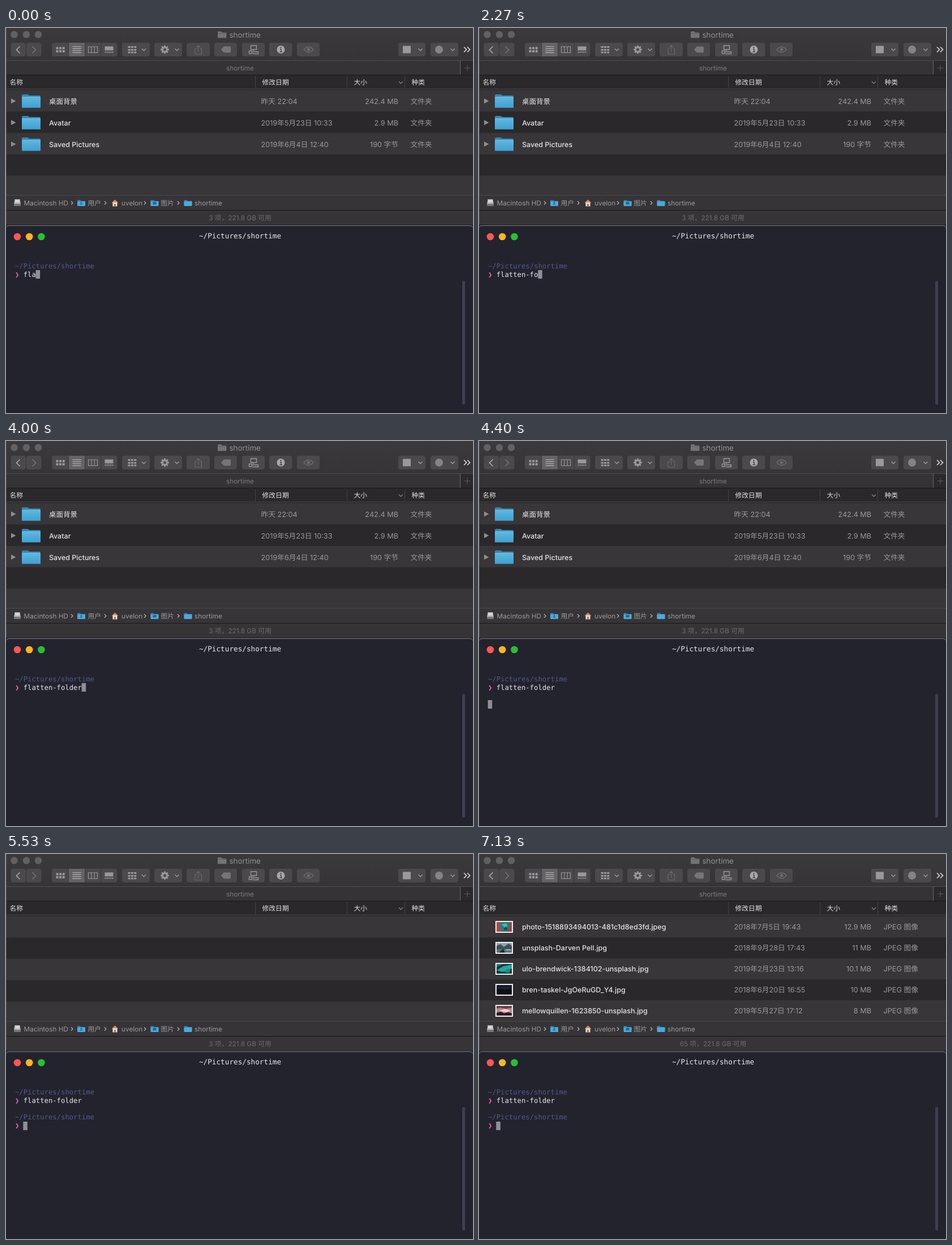
An HTML page that plays this animation: 825x679 px, repeating every 7190 ms.

```html
<!DOCTYPE html>
<html lang="zh-CN">
<head>
<meta charset="utf-8">
<title>flatten-folder</title>
<style>
html, body { margin: 0; width: 100%; height: 100%; overflow: hidden; background: #23232e; }
svg { display: block; width: 825px; height: 679px; }
text { font-family: Inter, "Noto Sans CJK SC", "Noto Sans CJK", sans-serif; text-rendering: geometricPrecision; white-space: pre; }
.mono { font-family: "DejaVu Sans Mono", monospace; }
</style>
</head>
<body>
<svg id="stage" viewBox="0 0 825 679" xmlns="http://www.w3.org/2000/svg"></svg>
<script>
const LOOP = 7190;
const COMMAND = 'flatten-folder';
const KEY_MS = 295, ENTER = 4070, DONE = 4800, CLEARED = 5530, LISTED = 5930;
const CHAR = 7.37, LEFT = 16;
const ICON = '#99989a', DIM = '#6c6a6d';

const rect = (x, y, w, h, fill, r = 0) =>
  `<rect x="${x}" y="${y}" width="${w}" height="${h}" rx="${r}" fill="${fill}"/>`;
const circle = (x, y, r, fill) => `<circle cx="${x}" cy="${y}" r="${r}" fill="${fill}"/>`;
const path = (d, fill) => `<path d="${d}" fill="${fill}"/>`;
const line = (d, color, w = 1) =>
  `<path d="${d}" fill="none" stroke="${color}" stroke-width="${w}"/>`;
const text = (x, y, s, size, fill, extra = '') =>
  `<text x="${x}" y="${y}" font-size="${size}" fill="${fill}" ${extra}>${s}</text>`;
const mono = (x, y, s, fill, id = '') => text(x, y, s, 12.24, fill, `class="mono" ${id}`);
const group = (id, content) => `<g id="${id}">${content}</g>`;
const at = (x, y, content, scale = 1) =>
  `<g transform="translate(${x} ${y}) scale(${scale})">${content}</g>`;
const MIDDLE = 'text-anchor="middle"', END = 'text-anchor="end"', MEDIUM = 'font-weight="500"';

const grid = (x, y, cols, rows, w, h, dx, dy) => {
  let out = '';
  for (let r = 0; r < rows; r++)
    for (let c = 0; c < cols; c++) out += rect(x + c * dx, y + r * dy, w, h, ICON, .6);
  return out;
};
const chevron = x => line(`M${x - 3.5} 36.5l3.5 3.5 3.5-3.5`, ICON, 1.5);

const folder = at(28, 116,
  path('M0 3Q0 1 2 1H10Q11.5 1 12.5 2.5L13 3H31Q33 3 33 5V20H0Z', '#3a85ad') +
  rect(0, 5.5, 33, 19.5, 'url(#blue)', 1.5) + rect(.5, 5.5, 32, .8, '#7cc9ea') +
  rect(.5, 24, 32, 1, '#3585b0'));
const miniFolder = x => at(x, 303,
  path('M0 1.5Q0 .5 1 .5H5L6.5 2H13Q14 2 14 3V8H0Z', '#3a85ad') + rect(0, 3, 14, 8, '#4aaadb', 1));

function gear(x, y) {
  let out = '';
  for (let a = 0; a < 360; a += 45)
    out += `<rect x="-1.4" y="-7.4" width="2.8" height="4" fill="${ICON}" transform="rotate(${a})"/>`;
  return at(x, y, out + `<circle r="4" fill="none" stroke="${ICON}" stroke-width="3"/>`);
}

function toolbar() {
  const buttons = [[8.5, 26.5], [36, 26.5], [81, 115.5], [205, 49], [262, 49], [319, 41],
    [368, 40], [417, 40], [465, 40.5], [514, 40], [693, 48], [750, 49]];
  return rect(0, 0, 825, 58, 'url(#bar)') +
    [14.5, 36, 57].map(x => circle(x, 11.5, 6.3, '#626063')).join('') +
    path('M374 7.5Q374 6 375.5 6H380L382 8H388Q389.500 8 389.500 9.500V16Q389.500 17.500 388 17.500H375.500Q374 17.500 374 16Z', '#757376') +
    rect(374, 9.2, 15.5, .8, '#5b595c') +
    text(394.5, 17, 'shortime', 13.4, '#929193') +
    buttons.map(([x, w]) => rect(x, 26, w, 24, '#4b494b', 4)).join('') +
    rect(110.5, 26, 29, 24, '#656366') +
    line('M110.5 26v24M139.5 26v24M168 26v24', '#3a383b') +
    line('M24.5 32.500L18.500 38.500 24.500 44.500', '#a7a6a8', 1.7) +
    line('M46.5 32.5l6 6-6 6', '#737174', 1.7) +
    grid(88.5, 33.5, 3, 2, 4, 4, 5.6, 5.6) +
    line('M117.5 33h15M117.5 36.500h15M117.5 40h15M117.5 43.500h15', '#c2c1c3', 1.2) +
    line('M145.500 33h16v10.500h-16zM150.800 33v10.500M156.200 33v10.500', ICON, 1.2) +
    rect(174.5, 32.500, 15, 7, ICON, .6) + grid(174.5, 41.5, 5, 1, 2.2, 2.2, 3.2, 0) +
    grid(215.5, 32, 3, 1, 4.2, 3, 5.3, 0) + grid(215.5, 37, 3, 2, 4.2, 3, 5.3, 4.5) + chevron(243.5) +
    gear(280.5, 38) + chevron(302) +
    line('M337 36h-3v10h11.500v-10h-3M339.700 42V31M336.500 34l3.200-3.200 3.200 3.200', DIM, 1.2) +
    path('M380 38L384 33.500Q385 32.500 386 32.500H395Q397 32.500 397 34.500V41.500Q397 43.500 395 43.500H386Q385 43.500 384 42.500Z', '#777578') +
    line('M432.500 31h10v7h-10zM429.500 40.500h5v4.500h-5zM437 38v2.500M436 42h9.500v3.500h-9.500', ICON, 1.4) +
    circle(485.5, 38, 7, '#a8a7a9') + circle(485.5, 34.5, 1.2, '#4b494b') +
    line('M484 37.500h2v4.500M483.500 42h4.500', '#4b494b', 1.6) +
    line('M526 38Q534.500 28.500 543 38 534.500 47.500 526 38Z', DIM, 1.3) + circle(534.5, 38, 2.8, DIM) +
    rect(701, 31.5, 14, 13, ICON) + chevron(732) +
    circle(765, 38, 7, '#858386') + chevron(789) +
    line('M809 33.500l4.500 4.500-4.500 4.500M815 33.500l4.500 4.500-4.500 4.500', '#dddcde', 1.6);
}

function tabsAndHeader() {
  return rect(0, 57, 825, 1, '#504e51') + rect(0, 58, 825, 25, '#353336') +
    rect(802, 58, 23, 25, '#2b292c') + rect(802, 58, 1, 25, '#6a686b') +
    line('M809.5 70.500h11M815 65v11', '#5a585b') +
    text(413.5, 75.3, 'shortime', 11.8, '#7d7b7e', MIDDLE) +
    rect(0, 83, 825, 25, '#2a282b') + rect(0, 82.5, 825, 1, '#171518') +
    [440, 602, 704].map(x => rect(x, 85, 1, 21, '#454346')).join('') +
    [[6.5, '名称'], [452.5, '修改日期'], [614.5, '大小'], [716.5, '种类']]
      .map(([x, s]) => text(x, 99.5, s, 11.8, '#e3e2e4', MEDIUM)).join('') +
    line('M694 94.500l3.500 3.500 3.500-3.500', '#8b898c', 1.2) +
    rect(0, 107, 825, 1, '#474548');
}

function stripes(top, pitch) {
  let out = rect(0, 108, 825, 187, '#2a282b');
  for (let i = 0; i < 5; i += 2)
    out += rect(0, top + i * pitch, 825, Math.min(pitch, 295 - top - i * pitch), '#383639');
  return out;
}

const row = (y, [name, date, size, kind], id = '') =>
  text(76, y + 4.6, name, 12.5, '#e4e3e5', MEDIUM) +
  text(450.5, y + 4.6, date, 12.7, '#9b999c') +
  text(693, y + 4.6, size, 12.7, '#9b999c', `${END} ${id}`) +
  text(714.5, y + 4.6, kind, 12.7, '#9b999c');

const folders = [
  ['桌面背景', '昨天 22:04', '242.4 MB'],
  ['Avatar', '2019年5月23日 10:33', '2.9 MB'],
  ['Saved Pictures', '2019年6月4日 12:40', '190 字节'],
];
const folderRows = () => folders.map((f, i) =>
  at(0, i * 38, folder + path('M9 124.300V133.300L17.500 128.800Z', '#8f8d90')) +
  row(129 + i * 38, [...f, '文件夹'], i === 2 ? 'id="lastSize"' : '')).join('');

const photos = [
  ['photo-1518893494013-481c1d8ed3fd.jpeg', '2018年7月5日 19:43', '12.9 MB'],
  ['unsplash-Darven Pell.jpg', '2018年9月28日 17:43', '11 MB'],
  ['ulo-brendwick-1384102-unsplash.jpg', '2019年2月23日 13:16', '10.1 MB'],
  ['bren-taskel-JgOeRuGD_Y4.jpg', '2018年6月20日 16:55', '10 MB'],
  ['mellowquillen-1623850-unsplash.jpg', '2019年5月27日 17:12', '8 MB'],
];
const thumbs = [
  rect(0, 0, 27, 17, '#1f7f78') + path('M0 0H8L5 9 11 17H0Z', '#b8434a') +
    path('M21 0H27V17H18L23 9Z', '#a33f48') + path('M9 4l8-2 3 5-7 2Z', '#45b8a6') + rect(13, 10, 6, 4, '#14534f'),
  rect(0, 0, 27, 17, '#8ba3ad') + path('M0 5L7 2 13 7 21 1 27 5V11H0Z', '#3d5059') +
    rect(0, 11, 27, 6, '#5b717b') + path('M4 17L12 10 15 17Z', '#1f2b32') + rect(16, 11, 9, 1.5, '#c3d0d5'),
  rect(0, 0, 27, 17, '#0f3b3d') + path('M0 11L12 4 27 1V8L10 14Z', '#27a79c') +
    path('M12 14L19 9 25 10 22 16Z', '#1c8a84') + path('M0 0H11L0 6Z', '#1c7773'),
  rect(0, 0, 27, 17, '#151a2b') + path('M0 9L8 6 15 9 22 7 27 9V17H0Z', '#0c0e17') + rect(3, 5, 20, 1, '#2d3044'),
  rect(0, 0, 27, 17, '#b9838e') + path('M0 0H27V3L16 5 5 3 0 5Z', '#64414f') +
    path('M4 9L14 5 25 8 18 11Z', '#f2d0c8') + path('M0 12L8 10 13 13 20 11 27 13V17H0Z', '#2a1a24'),
];
const photoRows = () => photos.map((p, i) => {
  const y = 129 + i * 37;
  return rect(29, y - 11, 31, 21, '#eeeeee') + at(31, y - 9, thumbs[i]) + row(y - .2, [...p, 'JPEG 图像']);
}).join('');

function footer() {
  const crumb = (x, s) => text(x, 312.600, s, 11.8, '#9d9b9e');
  return rect(0, 295, 825, 53, '#363437') + rect(0, 294.500, 825, 1, '#4c4a4d') +
    rect(0, 321, 825, 1, '#19171a') +
    path('M15.500 302H24.500L26 311H14Z', '#b9b8ba') + rect(14, 310, 12, 4, '#77757a', .8) +
    rect(16.500, 303.500, 7, 4, '#dad9db') +
    miniFolder(126) + circle(133, 307.700, 1.3, '#24678a') + rect(131, 309.400, 4, 2, '#24678a', 1) +
    path('M186.500 308.500L192.500 302.500 198.500 308.500Z', '#d98a5a') + rect(188.500, 307.500, 8, 7, '#e8e2d8') +
    rect(191.200, 310, 2.600, 4.500, '#9a6140') +
    miniFolder(255.500) + rect(259.500, 306.800, 6, 4.400, '#24678a', .5) + miniFolder(314.500) +
    crumb(31.500, 'Macintosh HD') + crumb(144.500, '用户') + crumb(204, 'uvelon') +
    crumb(273.500, '图片') + crumb(333, 'shortime') +
    [115.500, 174.500, 244.500, 303.500].map(x => line(`M${x - .5} 305.500l3 3-3 3`, '#b0aeb1', 1.3)).join('') +
    text(413.500, 338.600, '', 11.8, '#6d6b6e', `${MIDDLE} id="status"`);
}

function terminal() {
  const cwd = '~/Pictures/shortime', blue = '#505a88', pink = '#f56cb5';
  return rect(0, 347, 825, 1, '#1b1a1f') + rect(0, 348, 825, 340, '#85858c', 5) +
    rect(0, 349, 825, 340, '#23232e', 5) +
    ['#fc5753', '#fdb424', '#27c132'].map((c, i) => circle(20 + i * 21.200, 368, 6.300, c)).join('') +
    text(413.500, 371, cwd, 12.7, '#e9e9ec', `class="mono" ${MIDDLE}`) +
    rect(806, 446, 5, 218, '#3f3f53', 2.500) +
    mono(LEFT, 424, cwd, blue) + mono(LEFT, 439, '❯', pink) + mono(30.700, 439, '', '#e9e9ec', 'id="typed"') +
    group('nextPrompt', mono(LEFT, 468.300, cwd, blue) + mono(LEFT, 483.300, '❯', pink)) +
    `<rect id="cursor" width="7.500" height="15" fill="#908f94"/>`;
}

const stage = document.getElementById('stage');
stage.innerHTML = `<defs>
  <linearGradient id="bar" x2="0" y2="1"><stop stop-color="#3b393c"/><stop offset="1" stop-color="#363437"/></linearGradient>
  <linearGradient id="blue" x2="0" y2="1"><stop stop-color="#5cb9e3"/><stop offset="1" stop-color="#429fce"/></linearGradient>
</defs>` +
  group('folderView', stripes(109.500, 37.700) + group('folderRows', folderRows())) +
  group('photoView', stripes(110, 37) + photoRows()) +
  toolbar() + tabsAndHeader() + footer() + rect(0, 0, 1, 348, '#4f4d50') + terminal();

const el = id => document.getElementById(id);
const show = (id, on) => el(id).setAttribute('visibility', on ? 'inherit' : 'hidden');
const setText = (id, s) => { if (el(id).textContent !== s) el(id).textContent = s; };

function render(t) {
  const typed = Math.min(COMMAND.length, 3 + Math.floor(t / KEY_MS));
  setText('typed', COMMAND.slice(0, typed));
  const [x, y] = t >= DONE ? [30.300, 472] : t >= ENTER ? [15.700, 457] : [30.500 + typed * CHAR, 427];
  el('cursor').setAttribute('x', x);
  el('cursor').setAttribute('y', y);
  show('nextPrompt', t >= DONE);
  setText('lastSize', t >= DONE ? '0 字节' : '190 字节');
  show('folderRows', t < CLEARED);
  show('folderView', t < LISTED);
  show('photoView', t >= LISTED);
  setText('status', `${t >= LISTED ? 65 : 3} 项，221.8 GB 可用`);
}

function tick() {
  render(performance.now() % LOOP);
  requestAnimationFrame(tick);
}
tick();
</script>
</body>
</html>
```
